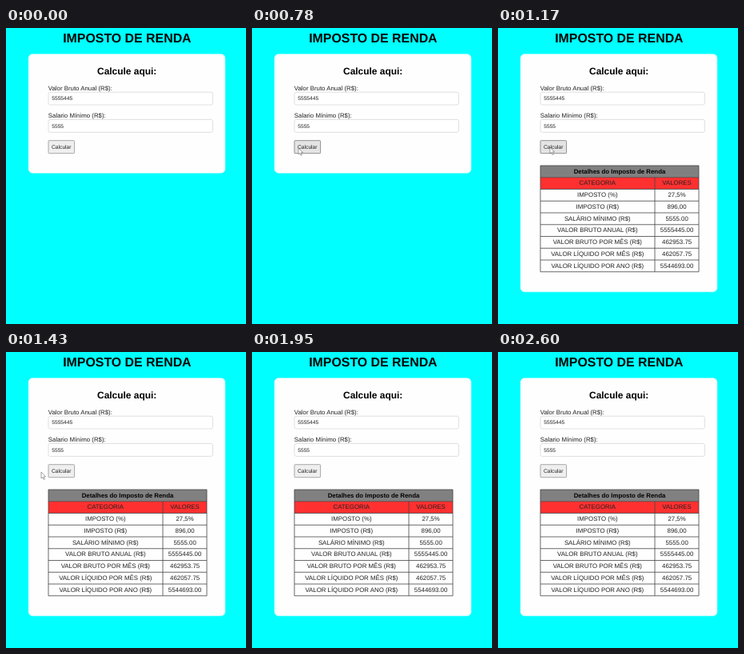
Recreate the animation shown at these times as an HTML page. Size 300 by 370 pixels, loop 2.99 s.

```html
<!DOCTYPE html>
<html lang="pt">
<head>
<meta charset="utf-8">
<style>
html, body { margin: 0; width: 100%; height: 100%; overflow: hidden; background: #0ff; }
svg { display: block; width: 300px; height: 370px; }
text {
  font-family: "Liberation Sans", Arial, sans-serif;
  font-size: 7.85px;
  fill: #222;
  text-rendering: geometricPrecision;
}
.bold { font-weight: bold; fill: #000; }
.mid { text-anchor: middle; }
.small { font-size: 6.7px; }
.field { fill: #fff; stroke: #d8d8d8; stroke-width: .8; }
.lines { fill: none; stroke: #444; stroke-width: .8; }
</style>
</head>
<body>
<svg viewBox="0 0 300 370">
  <rect width="300" height="370" fill="#0ff"/>
  <text class="bold mid" x="151.4" y="17.7" style="font-size:15.9px">IMPOSTO DE RENDA</text>
  <rect id="card" x="28.2" y="32.7" width="245.6" height="148.6" rx="5" fill="#fefefe" stroke="#fefefe" stroke-opacity=".5"/>
  <text class="bold mid" x="151.2" y="57.8" style="font-size:11.95px">Calcule aqui:</text>
  <text x="52.8" y="77.5">Valor Bruto Anual (R$):</text>
  <rect class="field" x="53" y="80.2" width="205.5" height="15.8" rx="2.5"/>
  <text class="small" x="57.2" y="90.2">5555445</text>
  <text x="52.8" y="112.3">Salario Mínimo (R$):</text>
  <rect class="field" x="53" y="114.4" width="205.5" height="16" rx="2.5"/>
  <text class="small" x="57.2" y="124.8">5555</text>
  <rect id="button" x="53" y="140.7" width="32.6" height="16" rx=".8"/>
  <text class="small" x="57" y="151">Calcular</text>
  <g id="table">
    <rect x="53" y="172" width="198" height="14.75" fill="#808080"/>
    <rect x="53" y="186.75" width="198" height="14.75" fill="#ff3030"/>
    <text class="bold mid" x="152" y="181.8">Detalhes do Imposto de Renda</text>
  </g>
  <path id="cursor" d="M0 0V8L1.8 6.4L3.1 9.4L4.4 8.8L3.1 5.9H5.6Z" fill="#fff" stroke="#666" stroke-width=".6"/>
</svg>
<script>
const $ = id => document.getElementById(id);
const STEP = 130, LOOP = 2990;
const TOP = 172, ROW = 14.75, BOTTOM = TOP + 9 * ROW;

const rows = [
  ["CATEGORIA", "VALORES"],
  ["IMPOSTO (%)", "27,5%"],
  ["IMPOSTO (R$)", "896,00"],
  ["SALÁRIO MÍNIMO (R$)", "5555.00"],
  ["VALOR BRUTO ANUAL (R$)", "5555445.00"],
  ["VALOR BRUTO POR MÊS (R$)", "462953.75"],
  ["VALOR LÍQUIDO POR MÊS (R$)", "462057.75"],
  ["VALOR LÍQUIDO POR ANO (R$)", "5544693.00"]
];

let cells = "", lines = `M53 ${TOP}H251V${BOTTOM}H53ZM196 ${TOP + ROW}V${BOTTOM}`;
rows.forEach(([label, value], i) => {
  const y = TOP + ROW * (i + 1);
  lines += `M53 ${y}H251`;
  cells += `<text class="mid" x="124.3" y="${y + 9.7}">${label}</text>
    <text class="mid" x="223.6" y="${y + 9.7}">${value}</text>`;
});
$("table").insertAdjacentHTML("beforeend", cells + `<path class="lines" d="${lines}"/>`);

// Pointer positions, one per step, starting at step 2
const path = [[12, 161], [25, 159], [37, 156], [48, 153], [58, 150], [63, 149],
  [65, 149], [65, 149], [65, 149], [44, 150], [18, 151], [-3.2, 149.5]];

function draw(now) {
  const step = Math.floor(now % LOOP / STEP);
  const spot = path[step - 2];
  const hover = step >= 6 && step <= 10;
  const done = step >= 9;
  $("card").setAttribute("height", done ? 297.1 : 148.6);
  $("table").style.display = done ? "" : "none";
  $("button").setAttribute("fill", hover ? "#e4e4e4" : "#efefef");
  $("button").setAttribute("stroke", hover ? "#909090" : "#a8a8a8");
  $("cursor").style.display = spot ? "" : "none";
  if (spot) $("cursor").setAttribute("transform", `translate(${spot})`);
}

const start = performance.now();
function tick() {
  draw(performance.now() - start);
  requestAnimationFrame(tick);
}
tick();
</script>
</body>
</html>
```
